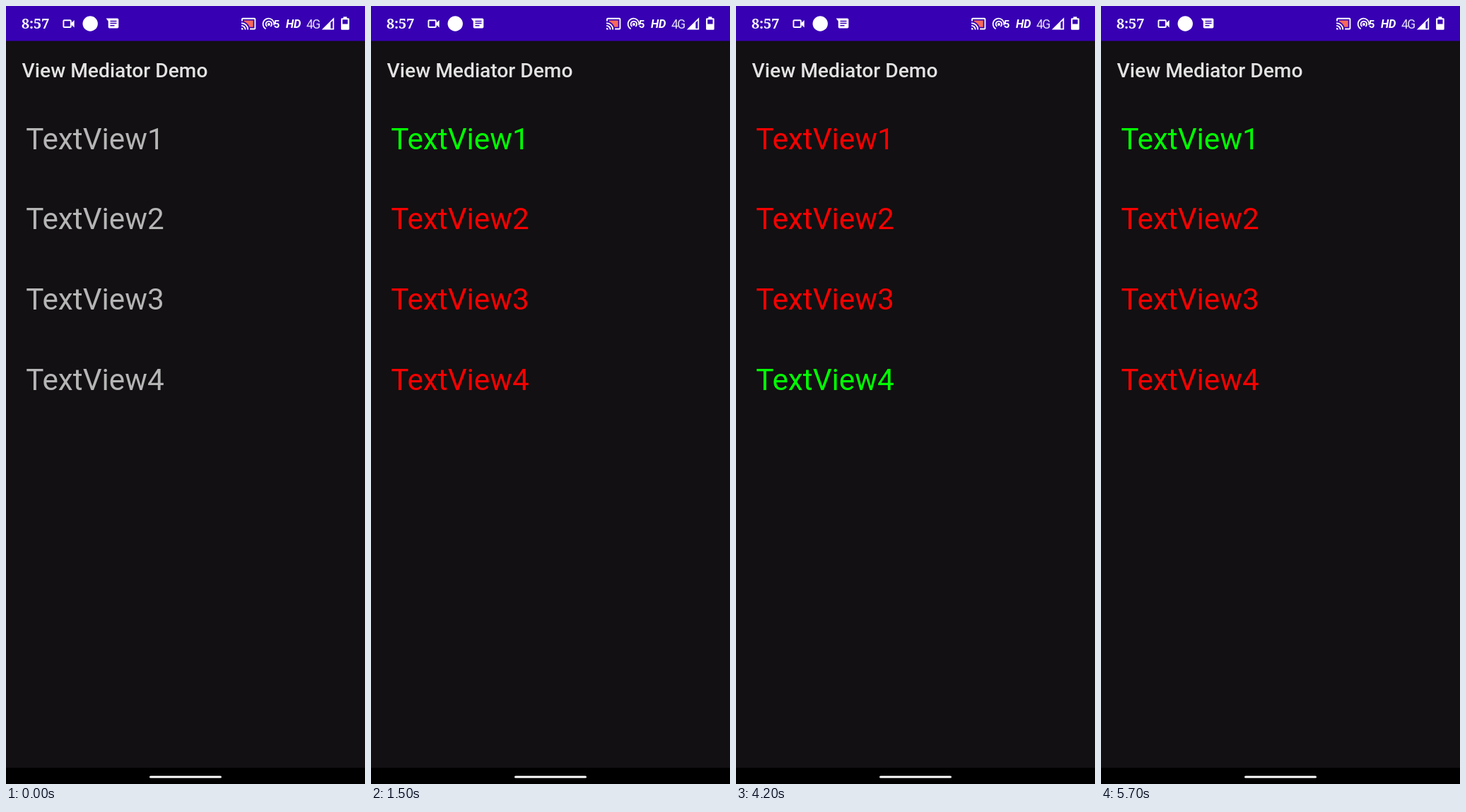
An HTML page for the animation above (6300 ms loop, 508x1102 px).

```html
<!DOCTYPE html>
<html lang="en">
<head>
<meta charset="utf-8">
<title>View Mediator Demo</title>
<style>
  html, body { margin: 0; width: 100%; height: 100%; overflow: hidden; background: #121012; }
  svg { display: block; width: 100%; height: 100%; }
  text { font-family: Roboto, sans-serif; }
  .clock { font: bold 19.8px "Noto Serif", serif; }
  .title { font-size: 28.2px; font-weight: 500; fill: #e3e2e3; }
  .item { font-size: 42.3px; }
</style>
</head>
<body>
<svg viewBox="0 0 508 1102" fill="#fff">
  <rect width="508" height="1102" fill="#121012"/>
  <rect width="508" height="49.5" fill="#3700b3"/>
  <rect y="1079" width="508" height="23" fill="#000"/>
  <rect x="203" y="1090.5" width="102" height="3" rx="1.5"/>

  <!-- left side of the status bar -->
  <text class="clock" x="22" y="32">8:57</text>
  <rect x="81.4" y="20.2" width="10.4" height="9.8" rx="1" fill="none" stroke="#fff" stroke-width="1.9"/>
  <path d="M92 24.2l4.6-4.2v10.4l-4.6-4.2z"/>
  <circle cx="119.2" cy="25" r="10.7"/>
  <path d="M141.6 17.4H157.600q1.700 0 1.700 1.700V29.800q0 1.700-1.700 1.700H146.400q-1.700 0-1.700-1.700V21.500z"/>
  <path d="M147.500 21.400h9M147.500 24.600h9M147.500 27.800h6" stroke="#3700b3" stroke-width="1.500"/>

  <!-- right side of the status bar -->
  <g id="tray">
    <g id="icons">
      <g transform="translate(332.2 14.1) scale(.92)">
        <path d="M1 18v3h3c0-1.660-1.340-3-3-3z"/>
        <path d="M2 8V5q0-1 1-1H21q1 0 1 1V19q0 1-1 1H14M1 15a6 6 0 0 1 6 6M1 11a10 10 0 0 1 10 10" fill="none" stroke="#fff" stroke-width="2"/>
        <path d="M19 7H5v1.630c3.960 1.280 7.090 4.410 8.370 8.370H19z" fill="#f8685c"/>
      </g>
      <g fill="none" stroke="#fff" stroke-width="1.8">
        <path d="M367.6 32.4a7.900 7.900 0 1 1 11.600-5.200"/>
        <path d="M369.4 29.1a4.200 4.200 0 1 1 5 0"/>
      </g>
      <circle cx="371.900" cy="26" r="2"/>
      <text x="378.7" y="31" font-size="15" font-weight="700">5</text>
      <text x="396" y="31" font-size="16.500" font-weight="700" font-style="italic" letter-spacing="-.4">HD</text>
    </g>
    <path id="arrows" d="M412.500 22.200l3.500-5.700 3.500 5.700zM412.500 25.800h7l-3.500 5.700z"/>
    <text x="425" y="31.500" font-size="17.500" letter-spacing="-1.500" fill="#e6def4">4G</text>
    <path d="M446.800 33.500h17.400V16.200z"/>
    <path d="M459.400 23.600l3-3v11.200h-3z" fill="#3700b3"/>
  </g>
  <path d="M477.400 15.200h5v2h2q1.300 0 1.300 1.300V32.500q0 1.300-1.300 1.300H475.400q-1.300 0-1.300-1.300V18.500q0-1.300 1.300-1.300h2z"/>
  <path d="M476.200 19.300h7.400v6.200h-7.400z" fill="#3700b3"/>

  <text class="title" x="22.600" y="100.500">View Mediator Demo</text>
  <g id="list">
    <text class="item" x="28.200" y="202.500">TextView1</text>
    <text class="item" x="28.200" y="316.300">TextView2</text>
    <text class="item" x="28.200" y="430">TextView3</text>
    <text class="item" x="28.200" y="543.800">TextView4</text>
  </g>
</svg>
<script>
const LOOP = 6300;
const ARROW_SPACE = 9;
const SLIDE = [1, 0.38, 0.1, 0];   // remaining distance, one value per 100 ms

// [time, selected item], 0 = none yet
const selections = [[0, 0], [1400, 1], [2700, 2], [3600, 3], [4200, 4], [4900, 3], [5200, 2], [5700, 1]];
// [time, data arrows visible]
const traffic = [[-1000, false], [200, true], [1200, false], [4300, true], [5200, false]];

const byId = id => document.getElementById(id);
const latest = (table, time) => table.filter(([start]) => start <= time).pop();
const moveX = (id, x) => byId(id).setAttribute("transform", `translate(${x} 0)`);

function draw(time) {
  const [, selected] = latest(selections, time);
  [...byId("list").children].forEach((item, i) => {
    const color = selected === i + 1 ? "#00ff00" : "#f60000";
    item.setAttribute("fill", selected ? color : "#b6b5b6");
  });

  const [start, busy] = latest(traffic, time);
  const step = Math.min(Math.floor((time - start) / 100), SLIDE.length - 1);
  const direction = busy ? 1 : -1;
  moveX("tray", direction * ARROW_SPACE * SLIDE[step]);
  moveX("icons", busy ? -ARROW_SPACE : 0);
  byId("arrows").setAttribute("opacity", busy ? 1 : 0);
}

function tick() {
  draw(performance.now() % LOOP);
  requestAnimationFrame(tick);
}
tick();
</script>
</body>
</html>
```
